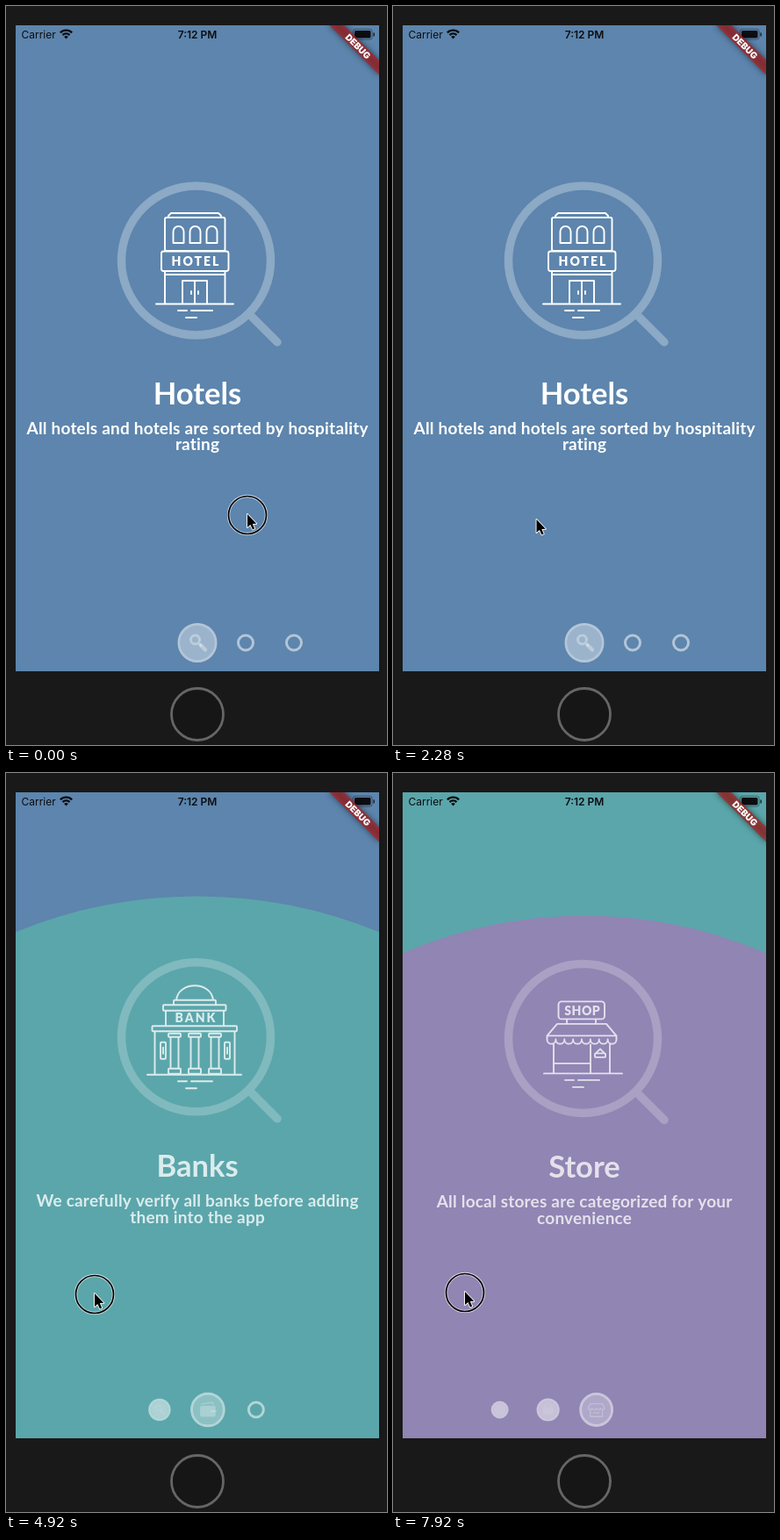
Animation of 434 by 842 pixels, one loop 8000 ms. Source, as an HTML page with a canvas:

```html
<!DOCTYPE html>
<html lang="en">
<head>
<meta charset="utf-8">
<title>Onboarding reveal</title>
<style>
  html, body { margin: 0; width: 100%; height: 100%; overflow: hidden; background: #191919; }
  canvas { display: block; width: 434px; height: 842px; }
</style>
</head>
<body>
<canvas id="stage"></canvas>
<script>
const W = 434, H = 842, LOOP = 8000, STEP = 120;
const SCREEN = { x: 11, y: 22, w: 414, h: 736 };
const MID = SCREEN.x + SCREEN.w / 2;
const REVEAL_Y = SCREEN.y + SCREEN.h * 0.9;
const REVEAL_R = Math.hypot(SCREEN.w / 2, SCREEN.h * 0.9);
const DRAG_PX = 236, SETTLE = 0.005;

const canvas = document.getElementById('stage');
const ctx = canvas.getContext('2d');
const dpr = window.devicePixelRatio || 1;
canvas.width = W * dpr;
canvas.height = H * dpr;

const pages = [
  { color: '#5d85ad', title: 'Hotels', art: hotel, icon: lensIcon,
    lines: ['All hotels and hotels are sorted by hospitality', 'rating'] },
  { color: '#5ba6ab', title: 'Banks', art: bank, icon: walletIcon,
    lines: ['We carefully verify all banks before adding', 'them into the app'] },
  { color: '#9085b3', title: 'Store', art: shop, icon: storeIcon,
    lines: ['All local stores are categorized for your', 'convenience'] }
];

// Pointer path: time, x, y
const path = [
  [0, 275, 579.5], [120, 274, 579.5], [1200, 163.5, 585.5], [2400, 163.5, 585.5],
  [2880, 287, 577], [3000, 286, 577], [3840, 194.5, 583.5], [4920, 101, 593.5],
  [5400, 101, 593.5], [6000, 332, 590], [6300, 332, 590], [6600, 262, 587],
  [6720, 259.5, 587], [7920, 82, 591.5], [8000, 82, 591.5]
];
const drags = [
  { down: 0, up: 1700, x: 270, page: 0, commit: false },
  { down: 2940, up: 5200, x: 286, page: 0, commit: true },
  { down: 6660, up: 8000, x: 259.5, page: 1, commit: true }
];

const mix = (a, b, k) => a + (b - a) * k;
const clamp = v => Math.max(0, Math.min(1, v));
const white = a => `rgba(255,255,255,${a})`;

function pointer(t) {
  let i = 1;
  while (i < path.length - 1 && path[i][0] < t) i++;
  const [a, b] = [path[i - 1], path[i]];
  const k = clamp((t - a[0]) / (b[0] - a[0]));
  return { x: mix(a[1], b[1], k), y: mix(a[2], b[2], k) };
}

function stateAt(t) {
  const drag = drags.filter(d => d.down <= t).pop();
  const pulled = time => clamp((drag.x - pointer(time).x) / DRAG_PX);
  const pressed = t < drag.up;
  let page = drag.page, p = pulled(Math.min(t, drag.up));
  if (!pressed) p = clamp(p + (drag.commit ? 1 : -1) * (t - drag.up) * SETTLE);
  if (p === 1) { page++; p = 0; }
  return { page, p, pressed };
}

// Drawing helpers
function stroke(build, width = 1.9) {
  ctx.lineWidth = width;
  ctx.beginPath();
  build();
  ctx.stroke();
}
function line(...pts) {
  ctx.moveTo(pts[0], pts[1]);
  for (let i = 2; i < pts.length; i += 2) ctx.lineTo(pts[i], pts[i + 1]);
}
function box(l, t, r, b, radius = 0) { ctx.roundRect(l, t, r - l, b - t, radius); }
function disc(x, y, r) {
  ctx.beginPath();
  ctx.arc(x, y, r, 0, Math.PI * 2);
}
function text(str, x, y, font, spacing = 0, align = 'center') {
  ctx.font = font;
  ctx.letterSpacing = spacing + 'px';
  ctx.textAlign = align;
  ctx.fillText(str, x + (align === 'center' ? spacing / 2 : 0), y);
  ctx.letterSpacing = '0px';
}
const sign = (str, y, spacing) => text(str, 215.5, y, '900 14px Lato, sans-serif', spacing);

function ground(l, r, y) {
  line(l, y, r, y);
  line(196, y + 7.5, 206, y + 7.5);
  line(211, y + 7.5, 235, y + 7.5);
  line(205, y + 15.5, 217, y + 15.5);
}

function hotel() {
  stroke(() => {
    line(185, 241, 185, 239, 188, 236, 242, 236, 245, 239, 245, 241);
    box(181, 241, 249.5, 279, 2);
    for (const x of [190.5, 209.5, 228.5]) {
      line(x, 270, x, 257);
      ctx.arc(x + 6, 257, 6, Math.PI, 0);
      ctx.lineTo(x + 12, 270);
      ctx.closePath();
    }
    box(177, 279.5, 253.5, 302, 2.5);
    line(181, 302, 181, 339);
    line(249.5, 302, 249.5, 339);
    line(181, 306, 249.5, 306);
    line(201, 339, 201, 313, 229, 313, 229, 339);
    line(215, 313, 215, 339);
    line(211, 325, 211, 328);
    line(219, 325, 219, 328);
    ground(171, 259, 339.5);
  });
  sign('HOTEL', 296, 2);
}

function bank() {
  stroke(() => {
    ctx.moveTo(194, 248);
    ctx.bezierCurveTo(196, 226, 234, 226, 236, 248);
    box(191, 248, 239, 253.5, 1);
    box(179, 253.5, 250.5, 260, 1);
    line(182, 260, 182, 277);
    line(248, 260, 248, 277);
    box(166.5, 277.5, 263, 283.5, 1);
    line(169.5, 284, 169.5, 333);
    line(260.5, 284, 260.5, 333);
    for (const x of [192, 215, 238]) {
      box(x - 7, 286, x + 7, 290, 1);
      line(x - 4.5, 290, x - 4.5, 326);
      line(x + 4.5, 290, x + 4.5, 326);
      box(x - 7, 326, x + 7, 332, 1);
    }
    box(176, 296, 182, 315, 1);
    box(249, 296, 255, 315, 1);
    line(179, 302, 179, 309);
    line(252, 302, 252, 309);
    ground(161, 268, 333);
  });
  sign('BANK', 273.5, 2);
}

function shop() {
  stroke(() => {
    box(188.5, 248, 241, 268, 3.5);
    line(198, 268, 198, 273);
    line(231, 268, 231, 273);
    line(175.5, 287, 187, 273.5, 243, 273.5, 254.5, 287);
    line(175.5, 291, 175.5, 287, 254.5, 287, 254.5, 291);
    for (let i = 0; i < 8; i++) {
      const x = 175.5 + i * 9.875;
      ctx.moveTo(x, 291);
      ctx.bezierCurveTo(x, 298, x + 9.9, 298, x + 9.9, 291);
    }
    line(183, 297, 183, 330);
    line(225, 297, 225, 330);
    line(247, 297, 247, 330);
    line(183, 318.5, 225, 318.5);
    line(236, 302, 231, 307);
    line(236, 302, 241, 307);
    box(230, 307, 242, 311.5, 1);
    ground(172, 261, 330);
  });
  sign('SHOP', 263.5, 0.5);
}

function lensIcon() {
  stroke(() => {
    ctx.arc(-2.5, -3.5, 5, 0, Math.PI * 2);
    line(1.5, 0.5, 4, 3);
  }, 3);
  stroke(() => line(4, 3, 9, 8), 4.5);
}
function walletIcon() {
  ctx.beginPath();
  box(-10, -5, 10, 9, 2);
  ctx.fill();
  stroke(() => line(-8, -7.5, 6, -9.5, 7, -7), 1.5);
  stroke(() => line(5, 2, 10, 2), 2.5);
}
function storeIcon() {
  stroke(() => {
    line(-8, -8, 8, -8, 11, -2);
    line(-8, -8, -11, -2);
    for (let i = 0; i < 4; i++) {
      ctx.moveTo(-11 + i * 5.5, -2);
      ctx.quadraticCurveTo(-8.25 + i * 5.5, 2, -5.5 + i * 5.5, -2);
    }
    line(-8, 1, -8, 9, 8, 9, 8, 1);
    line(-4, 4, 4, 4);
  }, 1.5);
}

function drawPage(page, p) {
  const shift = 1 - p;
  ctx.fillStyle = page.color;
  ctx.fillRect(SCREEN.x, SCREEN.y, SCREEN.w, SCREEN.h);
  ctx.save();
  ctx.globalAlpha = p;
  ctx.lineCap = ctx.lineJoin = 'round';

  ctx.save();
  ctx.translate(0, 50 * shift);
  ctx.strokeStyle = white(0.29);
  stroke(() => {
    ctx.arc(216.5, 290, 85, 0, Math.PI * 2);
    line(278, 352, 309, 383);
  }, 9.5);
  ctx.strokeStyle = ctx.fillStyle = '#fff';
  page.art();
  ctx.restore();

  ctx.translate(0, 30 * shift);
  ctx.fillStyle = '#fff';
  text(page.title, MID, 454, '700 34.6px Lato, sans-serif');
  page.lines.forEach((s, i) => text(s, MID, 487.5 + i * 18.8, '700 19px Lato, sans-serif', 0.2));
  ctx.restore();
}

function drawBubbles(cur, p) {
  pages.forEach((page, i) => {
    const active = i === cur ? 1 - p : i === cur + 1 ? p : 0;
    const x = MID + (i - cur - p) * 55, y = 725.5;
    const r = mix(20, 45, active) / 2;
    const passed = i < cur || (i === cur && p > 0);
    ctx.fillStyle = white(passed ? mix(0.53, 0.38, active) : 0.38 * active);
    disc(x, y, r - 3);
    ctx.fill();
    ctx.strokeStyle = white(0.53);
    disc(x, y, r - 1.5);
    ctx.lineWidth = 3;
    ctx.stroke();
    if (!active) return;
    ctx.save();
    ctx.translate(x, y);
    ctx.scale(r / 22.5, r / 22.5);
    ctx.globalAlpha = active;
    ctx.lineCap = ctx.lineJoin = 'round';
    ctx.strokeStyle = ctx.fillStyle = white(0.32);
    page.icon();
    ctx.restore();
  });
}

function drawStatus() {
  ctx.fillStyle = ctx.strokeStyle = '#0b0d10';
  text('Carrier', 17.5, 37, '400 12px Inter, sans-serif', 0, 'left');
  text('7:12 PM', MID, 37, '600 12px Inter, sans-serif');
  const a = Math.PI * 1.25, b = Math.PI * 1.75;
  for (const r of [5.6, 9.4]) stroke(() => ctx.arc(68.5, 37, r, a, b), 2.4);
  ctx.beginPath();
  ctx.moveTo(68.5, 37.5);
  ctx.arc(68.5, 37.5, 3.4, a, b);
  ctx.fill();
  ctx.beginPath();
  box(397, 28, 415.5, 36.5, 1.5);
  ctx.fill();
  ctx.globalAlpha = 0.4;
  stroke(() => box(395.3, 26.3, 417.2, 38.2, 3), 1);
  ctx.globalAlpha = 1;
  ctx.fillRect(418.5, 30.5, 1.2, 4);
}

function drawBanner() {
  ctx.save();
  ctx.translate(SCREEN.x + SCREEN.w, SCREEN.y);
  ctx.rotate(Math.PI / 4);
  ctx.filter = `blur(${3.5 * dpr}px)`;
  ctx.fillStyle = 'rgba(0,0,0,.5)';
  ctx.fillRect(-40, 28, 80, 12);
  ctx.filter = 'none';
  ctx.fillStyle = 'rgba(183,28,28,.63)';
  ctx.fillRect(-40, 28, 80, 12);
  ctx.fillStyle = '#fff';
  text('DEBUG', 0, 37.7, '900 10.2px Inter, sans-serif');
  ctx.restore();
}

function drawPointer({ x, y }, pressed) {
  if (pressed) {
    disc(x, y + 0.5, 21.5);
    ctx.strokeStyle = white(0.65);
    ctx.lineWidth = 3.4;
    ctx.stroke();
    ctx.strokeStyle = '#000';
    ctx.lineWidth = 1.7;
    ctx.stroke();
  }
  ctx.save();
  ctx.translate(x, y);
  ctx.beginPath();
  line(0, -0.5, 0, 14.5, 3.4, 11.4, 5.9, 17, 8.2, 16, 5.8, 10.5, 10.3, 10.3);
  ctx.closePath();
  ctx.lineJoin = 'round';
  ctx.strokeStyle = '#fff';
  ctx.lineWidth = 1.8;
  ctx.stroke();
  ctx.fillStyle = '#000';
  ctx.fill();
  ctx.restore();
}

function draw(t) {
  const { page, p, pressed } = stateAt(t);
  ctx.setTransform(dpr, 0, 0, dpr, 0, 0);
  ctx.fillStyle = '#191919';
  ctx.fillRect(0, 0, W, H);
  ctx.strokeStyle = '#666';
  ctx.fillStyle = '#161616';
  disc(MID, 807, 29.5);
  ctx.fill();
  ctx.lineWidth = 2.8;
  ctx.stroke();

  ctx.save();
  ctx.beginPath();
  ctx.rect(SCREEN.x, SCREEN.y, SCREEN.w, SCREEN.h);
  ctx.clip();
  drawPage(pages[page], 1);
  if (p > 0) {
    ctx.save();
    disc(MID, REVEAL_Y, REVEAL_R * p);
    ctx.clip();
    drawPage(pages[page + 1], p);
    ctx.restore();
  }
  drawBubbles(page, p);
  drawStatus();
  drawBanner();
  ctx.restore();
  drawPointer(pointer(t), pressed);
}

const start = performance.now();
function tick() {
  const t = (performance.now() - start) % LOOP;
  draw(Math.floor(t / STEP) * STEP);
  requestAnimationFrame(tick);
}
tick();
</script>
</body>
</html>
```
